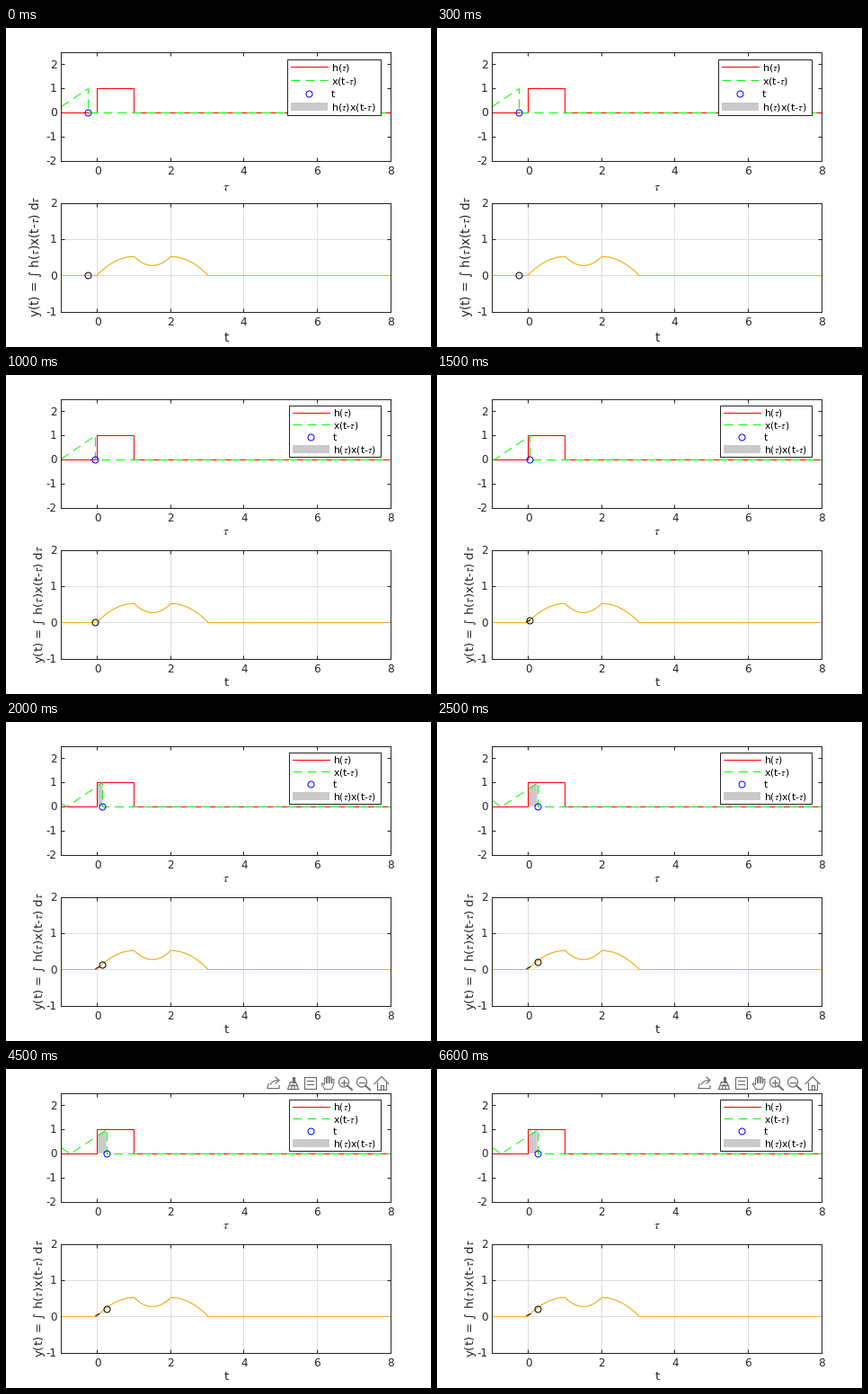
These frames come from a looping animation (473x355 px, 8 s). A matplotlib script:

```python
import numpy as np
import matplotlib.pyplot as plt
from matplotlib.animation import FuncAnimation
from matplotlib.patches import Rectangle
from matplotlib.transforms import Affine2D

W, H, DPI = 473, 355, 72          # at 72 dpi one point is one pixel
STEP_MS, FRAMES = 500, 16
LAST_STEP, TOOLBAR_FROM = 5, 9
INK, ICON = "#262626", "#6e6e6e"
RED, GREEN, BLUE, GOLD, SHADE = "#ff0000", "#00ff00", "#0000ff", "#edb120", "#cacaca"
DASH = (0, (10, 6))
TAU = r"$\tau$"
PULSE, RAMP = f"h({TAU})", f"x(t\u2010{TAU})"

plt.rcParams.update({"font.family": "DejaVu Sans", "mathtext.fontset": "stix",
                     "lines.linewidth": 1, "axes.linewidth": 1,
                     "lines.dash_capstyle": "butt", "lines.scale_dashes": False})

fig = plt.figure(figsize=(W / DPI, H / DPI), dpi=DPI, facecolor="white")


def x_signal(s):
    return np.where((s >= 0) & (s <= 2), np.abs(s - 1), 0.0)


def response(t):
    """Convolution of the unit pulse with x."""
    return np.select(
        [t < 0, t < 1, t < 2, t < 3],
        [0 * t, t - t**2 / 2, ((2 - t)**2 + (t - 1)**2) / 2, (1 - (t - 2)**2) / 2],
        0.0)


def make_axes(top, lo, hi):
    left, width, height = 60.55, 367, 121
    ax = fig.add_axes([left / W, 1 - (top + height - .3) / H, width / W, height / H])
    ax.set(xlim=(-1, 8), ylim=(lo, hi), xticks=range(0, 9, 2),
           yticks=np.arange(lo, int(hi) + 1))
    ax.tick_params(direction="in", length=4, width=1, color=INK, top=True,
                   right=True, labelbottom=False, labelleft=False)
    ax.spines[:].set_color(INK)
    return ax


upper = make_axes(27, -2, 2.5)
lower = make_axes(195, -1, 2)
lower.set_axisbelow(True)
lower.grid(color="#dedede", linewidth=1)

# Overlay in pixel units, y pointing down
page = fig.add_axes([0, 0, 1, 1], zorder=5)
page.set(xlim=(0, W), ylim=(H + .4, .4))
page.axis("off")


def ring(ax, color):
    return ax.plot([], [], "o", ms=7, mfc="none", mec=color, mew=1,
                   clip_on=False, zorder=4)[0]


# Upper plot
area, = upper.fill([0, 0, 0], [0, 0, 0], color=SHADE, lw=0, zorder=1)
upper.plot([-1, 0, 0, 1, 1, 8], [0, 0, 1, 1, 0, 0], color=RED)
moving, = upper.plot([], [], color=GREEN, ls=DASH, snap=True)
upper_ring = ring(upper, BLUE)

# Lower plot
nudge = lower.transData + Affine2D().translate(.5, .9)
tt = np.linspace(0, 3, 241)
for span in ([-1, 0], [3, 8]):
    lower.plot(span, [0, 0], color=GOLD)
lower.plot(tt, response(tt), color=GOLD, lw=1.2, transform=nudge)
trace, = lower.plot([-.05, .05], [0, response(.05)], color="black", transform=nudge)
lower_ring = ring(lower, "black")


def label(ax, s, xy, offset, size, ha="center", **kw):
    return ax.annotate(s, xy, offset, textcoords="offset points", fontsize=size,
                       ha=ha, va="baseline", annotation_clip=False, **kw)


def make_labels(unit, name_drop, name_left):
    """Tick labels and axis names; unit scales all text."""
    out = []
    for ax, name in ((upper, TAU), (lower, "t")):
        floor = ax.get_ylim()[0]
        out += [label(ax, str(v), (v, floor), (.3, -15.2), 10 * unit, color=INK)
                for v in ax.get_xticks()]
        out += [label(ax, str(v), (-1, v), (-3.8, -4.4), 10 * unit, "right", color=INK)
                for v in ax.get_yticks()]
        out.append(label(ax, name, (3.5, floor), (.9, -name_drop), 11 * unit, color=INK))
    out.append(label(lower, f"y(t) = \u222b {PULSE}{RAMP} d{TAU}", (-1, .5),
                     (-name_left, .6), 11 * unit, color=INK,
                     rotation=90, rotation_mode="anchor"))
    return out


def make_legend(unit, x, y, w, h):
    a, b = x + 4, x + 45
    rows = y + h * (np.arange(4) + .6) / 4.2
    mark = ring(page, BLUE)
    mark.set_data([(a + b) / 2 - .5], [rows[2]])
    out = [mark]
    out.append(page.add_patch(Rectangle((x, y), w, h, fc="white", ec=INK, lw=1)))
    out.append(page.add_patch(Rectangle((a, rows[3] - 4.5), b - a, 9, fc=SHADE, lw=0)))
    out += page.plot([a, b], [rows[0]] * 2, color=RED)
    out += page.plot([a, b], [rows[1]] * 2, color=GREEN, ls=DASH)
    out += [label(page, s, (b + 4, row), (0, -4), 9 * unit, "left")
            for row, s in zip(rows, (PULSE, RAMP, "t", PULSE + RAMP))]
    return out


def make_toolbar():
    out = []

    def stroke(*pts, lw=1.2):
        out.extend(page.plot(*zip(*pts), color=ICON, lw=lw,
                             solid_joinstyle="round"))

    def block(x, y, w, h, fill="none"):
        out.append(page.add_patch(Rectangle((x, y), w, h, fc=fill, ec=ICON, lw=1.2)))

    def arc(cx, cy, r, start=0, stop=360):
        a = np.radians(np.linspace(start, stop, 40))
        stroke(*zip(cx + r * np.cos(a), cy - r * np.sin(a)))

    def export(x):
        stroke((x - 6, 17), (x - 7, 22), (x + 6, 22), (x + 6, 19))
        arc(x + 4, 22, 9, 90, 150)
        stroke((x + 2, 9.5), (x + 6, 13), (x + 2, 16.5))

    def brush(x):
        block(x - 1, 9, 2, 6, ICON)
        stroke((x - 3, 15), (x + 3, 15), (x + 6, 23), (x - 6, 23), (x - 3, 15))
        stroke((x - 4, 18), (x + 4, 18))
        for side in (-1, 1):
            stroke((x + side, 18), (x + 2 * side, 23))

    def note(x):
        block(x - 6, 9, 13, 13)
        for y in (13, 17):
            stroke((x - 3, y), (x + 4, y))

    def hand(x):
        pts = [(x - 3, 23), (x - 7, 17), (x - 6, 16), (x - 3.5, 18)]
        for i in range(4):
            left, tip = x - 3.5 + 2.8 * i, 9 + .9 * (i - 1.2)**2
            pts += [(left, 16), (left, tip), (left + 2, tip), (left + 2, 16)]
        stroke(*pts, (x + 6, 19), (x + 4, 23), (x - 3, 23), lw=1)

    def lens(x, plus):
        arc(x, 15, 5.5)
        stroke((x + 4, 19), (x + 9, 23.5), lw=2)
        stroke((x - 3, 15), (x + 3, 15))
        if plus:
            stroke((x, 12), (x, 18))

    def home(x):
        stroke((x - 8, 17), (x, 9), (x + 8, 17))
        stroke((x - 5, 15), (x - 5, 23), (x + 5, 23), (x + 5, 15))
        block(x - 1.5, 18, 3, 5)

    export(298)
    brush(319.5)
    note(338)
    hand(358)
    lens(376, True)
    lens(396, False)
    home(418)
    return out


opening = make_labels(1.235, 32.9, 23.5) + make_legend(1.235, 313, 35, 104, 62)
settled = make_labels(1.2, 30.4, 19.5) + make_legend(1.2, 315, 34, 102, 57)
toolbar = make_toolbar()


def show(group, on):
    for artist in group:
        artist.set_visible(on)


def update(i):
    t = -0.25 + 0.1 * min(i, LAST_STEP)
    tau = np.array([-1, max(t - 1, -1), t])
    moving.set_data([*tau, t, 8], [*x_signal(t - tau), 0, 0])
    upper_ring.set_data([t], [0])
    lower_ring.set_data([t], [response(t)])
    end = max(t, 0)
    area.set_xy([(0, 0), (0, x_signal(end)), (end, 1), (end, 0)])
    show([area, trace], t > 0)
    show(opening, i == 0)
    show(settled, i > 0)
    show(toolbar, i >= TOOLBAR_FROM)
    return moving, upper_ring, lower_ring, area, trace


anim = FuncAnimation(fig, update, frames=FRAMES, interval=STEP_MS,
                     repeat=True, repeat_delay=0, blit=False)
plt.show()
```
